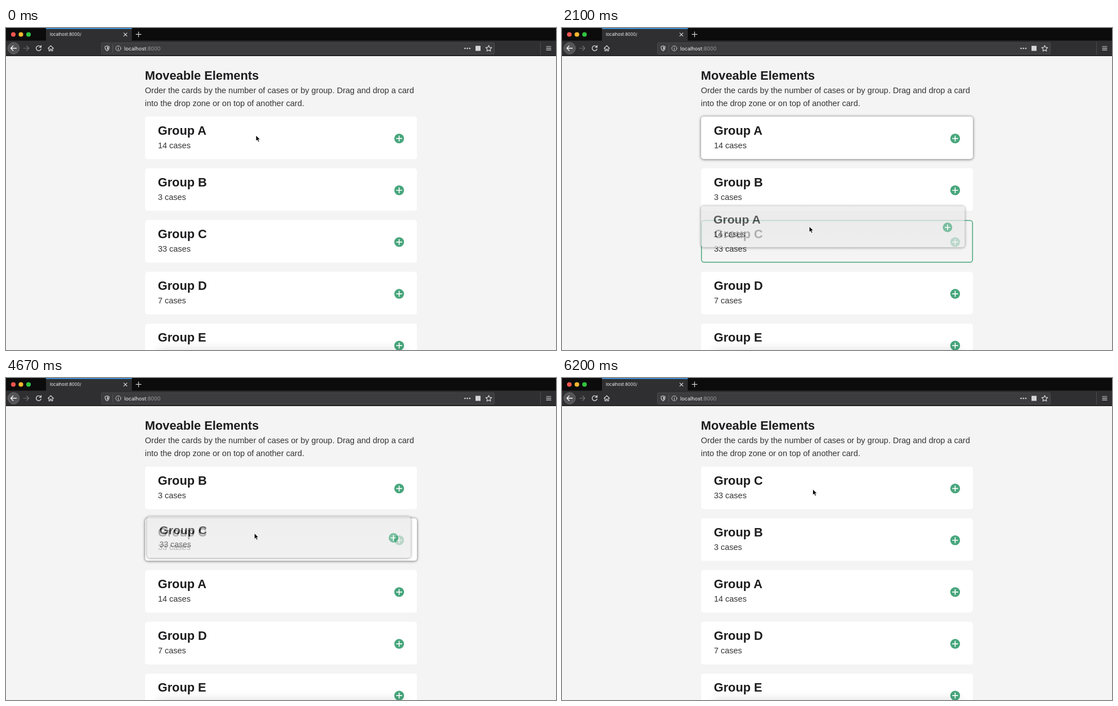
These frames come from a looping animation (977 px wide and 573 px high, 6560 ms). An HTML page:

```html
<!DOCTYPE html>
<html lang="en">
<head>
<meta charset="utf-8">
<title>Moveable Elements</title>
<style>
  html, body { margin: 0; width: 100%; height: 100%; overflow: hidden; background: #f4f4f4; }
  svg { display: block; width: 977px; height: 573px; }
  text { white-space: pre; }
  .body { font: 14.5px "Liberation Sans", Arial, sans-serif; fill: #343436; }
  .head { font: bold 21.8px "Liberation Sans", Arial, sans-serif; fill: #1d1d1f; }
  .ui { font-family: Inter, sans-serif; fill: #f2f2f3; }
  .icon { fill: none; stroke: #d4d4d6; stroke-width: 1.2; stroke-linecap: round; stroke-linejoin: round; }
</style>
</head>
<body>
<svg id="stage" viewBox="0 0 977 573" xmlns="http://www.w3.org/2000/svg">
  <defs>
    <filter id="soft" x="-10%" y="-40%" width="120%" height="180%"><feGaussianBlur stdDeviation="2.6"/></filter>
    <filter id="haze" x="-10%" y="-200%" width="120%" height="500%"><feGaussianBlur stdDeviation="9"/></filter>
    <linearGradient id="veil" x1="0" y1="0" x2="0" y2="1">
      <stop offset="0" stop-color="#e8e8e8"/><stop offset="1" stop-color="#ececec"/>
    </linearGradient>
  </defs>

  <rect width="977" height="573" fill="#f4f4f4"/>
  <text class="head" x="246.8" y="91.8">Moveable Elements</text>
  <text class="body" x="246.8" y="116.2">Order the cards by the number of cases or by group. Drag and drop a card</text>
  <text class="body" x="246.8" y="139.3">into the drop zone or on top of another card.</text>

  <g id="list"></g>
  <rect x="270" y="571" width="438" height="30" opacity=".11" filter="url(#haze)"/>

  <!-- browser bars -->
  <rect width="977" height="23" fill="#0c0c0d"/>
  <rect y="22.5" width="977" height="27.5" fill="#2f2f31"/>
  <rect y="49" width="977" height="1" fill="#111113"/>
  <rect x="71" width="152.5" height="23" fill="#2f2f31"/>
  <rect x="71" width="152.5" height="1.6" fill="#3f9ff2"/>
  <circle cx="13" cy="11.5" r="4.1" fill="#f4564f"/>
  <circle cx="26.5" cy="11.5" r="4.1" fill="#f5b731"/>
  <circle cx="40" cy="11.5" r="4.1" fill="#30c33f"/>
  <text class="ui" x="78" y="14.2" font-size="7.5">localhost:8000/</text>
  <path class="icon" d="M209.3 8.8l5.6 5.6m0-5.6l-5.6 5.6M231 11.3h9m-4.5-4.5v9"/>

  <circle cx="13.5" cy="36" r="10.3" fill="#545456" stroke="#737375" stroke-width=".8"/>
  <path class="icon" style="stroke:#f5f5f6;stroke-width:1.4" d="M18.5 36h-10m4.2-4.3L8.5 36l4.2 4.3"/>
  <path class="icon" style="stroke:#747476" d="M31.2 36h9.4m-4-4.2l4 4.2-4 4.2"/>
  <path class="icon" style="stroke-width:1.4" d="M61.2 33a4.4 4.4 0 1 0 1 4.3M62.4 31.2v3.2h-3.2"/>
  <path class="icon" d="M74.6 36.2l4.9-4.8 4.9 4.8M76.2 35.5v5.2h2.2v-3h2.2v3h2.2v-5.2"/>

  <rect x="169.5" y="26.2" width="698" height="20.2" rx="2" fill="#3c3c3e" stroke="#4b4b4d"/>
  <path class="icon" style="stroke-width:1.1" d="M179.6 31.8l3.6 1.2c.2 3.8-.9 6.2-3.6 7.8-2.7-1.6-3.8-4-3.6-7.8z"/>
  <path d="M179.6 33.2l2.3.8c0 2.6-.7 4.2-2.3 5.3z" fill="#d4d4d6"/>
  <path d="M189.5 29v14.5" stroke="#555557"/>
  <circle class="icon" cx="199.5" cy="36.2" r="4.5" style="stroke-width:.9"/>
  <path class="icon" style="stroke-width:1.1" d="M199.5 36v2.4m0-4.5v.1"/>
  <text class="ui" x="210" y="39.6" font-size="9.15">localhost<tspan fill="#99999b">:8000</tspan></text>
  <g fill="#d4d4d6">
    <circle cx="815.4" cy="36.2" r="1.3"/><circle cx="819.6" cy="36.2" r="1.3"/><circle cx="823.8" cy="36.2" r="1.3"/>
    <rect x="834" y="31.7" width="9" height="9"/>
  </g>
  <path class="icon" d="M857.5 31l1.6 3.4 3.7.5-2.7 2.6.7 3.7-3.3-1.8-3.3 1.8.7-3.7-2.7-2.6 3.7-.5z"/>
  <path d="M949.5 24.5v23" stroke="#4b4b4d"/>
  <path class="icon" d="M960 33h8m-8 3.1h8m-8 3.1h8"/>

  <g id="ghost" opacity=".7"></g>
  <path id="cursor" d="M0 0v10.2l2.4-2.1 1.7 3.8 1.9-.8-1.7-3.7h3.2z" fill="#000" stroke="#fff" stroke-width=".8" stroke-linejoin="round"/>
</svg>

<script>
const LOOP = 6560, LEFT = 247, TOP = 157.4, PITCH = 92.15, W = 483, H = 75.8;
const GREEN = "#47a67c";
const cases = { A: 14, B: 3, C: 33, D: 7, E: 21 };
const orders = [[0, "ABCDE"], [3200, "BCADE"], [6200, "CBADE"]];

// card, start, ghost released, card settled, ghost grab x
const drags = [
  { card: "A", from: 630, release: 3010, to: 3200, dx: 192.2 },
  { card: "C", from: 4670, release: 6010, to: 6200, dx: 190.8 }
];
const hovers = [
  { card: "B", from: 1265, to: 1890 },
  { card: "C", from: 1960, to: 3200 },
  { card: "B", from: 4990, to: 6200 }
];
// time, pointer x, pointer y, ghost grab y
const path = [
  [0, 444, 191, 33], [610, 444, 191, 33], [970, 442, 230, 37], [1270, 441, 252, 37.5],
  [1770, 440, 296.5, 38.5], [1930, 439.5, 343, 37], [2200, 439, 359, 36], [2630, 438.5, 366.7, 35.7],
  [3540, 438.5, 366.7, 35.7], [3570, 438.5, 363.7, 35], [3690, 440, 315, 32], [3800, 441, 281, 30],
  [4640, 441, 281, 30], [4970, 443, 231, 28], [5300, 445, 204, 29], [5470, 445.5, 198, 30], [LOOP, 445.5, 198, 30]
];

const $ = id => document.getElementById(id);

const cardMarkup = (name, fill) => `
  <rect class="shade" y=".5" width="${W}" height="${H}" rx="5" opacity=".62" filter="url(#soft)"/>
  <rect class="face" width="${W}" height="${H}" rx="5" fill="${fill}"/>
  <rect class="edge" x=".7" y=".7" width="${W - 1.4}" height="${H - 1.4}" rx="4.5" fill="none" stroke="${GREEN}" stroke-width="1.5"/>
  <text class="head" x="22.7" y="32.4">Group ${name}</text>
  <text class="body" x="22.9" y="56.5">${cases[name]} cases</text>
  <circle cx="451.4" cy="39.2" r="8.7" fill="${GREEN}"/>
  <path d="M446.2 39.2h10.4m-5.2-5.2v10.4" stroke="#fff" stroke-width="1.7"/>`;

const cards = {};
for (const name in cases) {
  const g = document.createElementNS("http://www.w3.org/2000/svg", "g");
  g.innerHTML = cardMarkup(name, "#fff");
  $("list").append(g);
  cards[name] = g;
}

const place = (el, x, y, s = 1) => el.setAttribute("transform", `translate(${x} ${y}) scale(${s})`);
const show = (el, on) => el.setAttribute("visibility", on ? "visible" : "hidden");
const during = (list, t) => list.find(d => t >= d.from && t < d.to);

function pointer(t) {
  const i = Math.max(1, path.findIndex(p => p[0] >= t));
  const a = path[i - 1], b = path[i];
  const k = (t - a[0]) / (b[0] - a[0]);
  return [1, 2, 3].map(n => a[n] + (b[n] - a[n]) * k);
}

let ghostName = "";

function draw(t) {
  const order = orders.filter(o => t >= o[0]).pop()[1];
  const drag = during(drags, t), hover = during(hovers, t);
  [...order].forEach((name, row) => {
    const g = cards[name], over = !!hover && hover.card === name;
    place(g, LEFT, TOP + row * PITCH);
    show(g.querySelector(".shade"), drag && drag.card === name);
    show(g.querySelector(".edge"), over);
    g.querySelector(".face").setAttribute("fill", over ? "#f4f4f4" : "#fff");
  });

  const [x, y, grab] = pointer(t);
  place($("cursor"), x, y);

  const held = !!drag && t < drag.release;
  $("ghost").style.display = held ? "" : "none";
  if (!held) return;
  if (ghostName !== drag.card) {
    ghostName = drag.card;
    $("ghost").innerHTML = cardMarkup(ghostName, "url(#veil)");
    show($("ghost").querySelector(".edge"), false);
  }
  place($("ghost"), x - drag.dx, y - grab, .97);
}

const start = performance.now();
function tick() {
  draw((performance.now() - start) % LOOP);
  requestAnimationFrame(tick);
}
tick();
</script>
</body>
</html>
```
